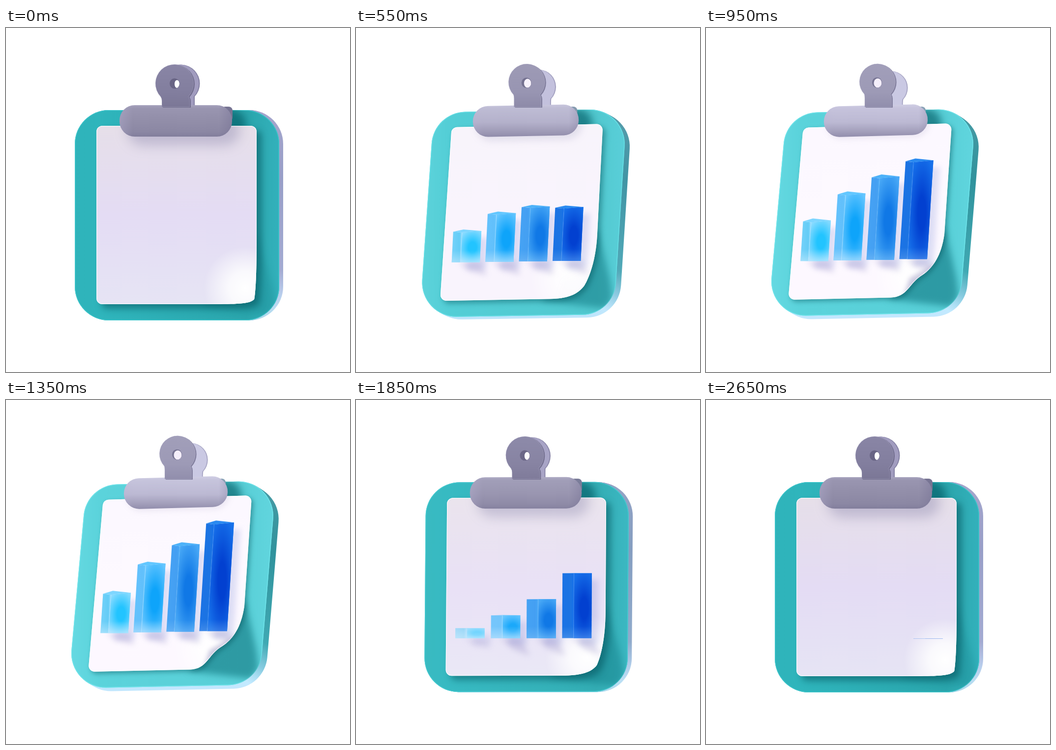
Animation, 700 px wide and 700 px high, one loop 2700 ms. Source, as an HTML page with a canvas:

```html
<!DOCTYPE html>
<html lang="en">
<head>
<meta charset="utf-8">
<title>Clipboard chart</title>
<style>
  html, body { margin: 0; width: 100%; height: 100%; overflow: hidden; background: #fff; }
  canvas { display: block; }
</style>
</head>
<body>
<canvas id="stage" width="700" height="700"></canvas>
<script>
const ctx = document.getElementById('stage').getContext('2d');
const LOOP = 2700, STEP = 50;

const clamp = v => Math.max(0, Math.min(1, v));
const lerp = (a, b, k) => a + (b - a) * k;
const mix = (a, b, k) => {
  const part = (c, i) => parseInt(c.slice(1 + 2 * i, 3 + 2 * i), 16);
  return `rgb(${[0, 1, 2].map(i => Math.round(lerp(part(a, i), part(b, i), k)))})`;
};
const settle = (t, start) => 1 - (1 - clamp((t - start) / 1170) ** 1.2) ** 3;
const sway = (t, start, span) => (1 - Math.cos(Math.PI * clamp((t - start) / span))) / 2;

// Quads are TL, TR, BR, BL; first facing the viewer, then turned.
const BOARD = [[[140, 167], [556, 167], [556, 595], [140, 595]],
               [[164, 173], [550, 164], [515, 579], [126, 587]]];
const PAPER = [[[184, 199], [510, 199], [510, 562], [184, 562]],
               [[198, 203], [500, 194], [476, 546], [167, 553]]];
const ROLL = [[[231, 157], [460, 157], [460, 221], [231, 221]],
              [[240, 160], [452, 154.5], [450, 217], [240, 222.5]]];
const BARS = [
  { full: 87, rise: 29, fall: 1329, side: '#64ccf6', edge: '#8edcff', core: '#22c4ff' },
  { full: 143, rise: 76, fall: 1410, side: '#62c0fb', edge: '#66c6ff', core: '#0ea4fa' },
  { full: 181, rise: 142, fall: 1495, side: '#449ff2', edge: '#48a8f6', core: '#1078e6' },
  { full: 224, rise: 236, fall: 1595, side: '#1c74e2', edge: '#1670ea', core: '#0240d0' }
];

const pose = ([from, to], p) =>
  from.map((pt, i) => [lerp(pt[0], to[i][0], p), lerp(pt[1], to[i][1], p)]);

const within = quad => (u, v) => [0, 1].map(i =>
  lerp(lerp(quad[0][i], quad[1][i], u), lerp(quad[3][i], quad[2][i], u), v));

function poly(points) {
  const path = new Path2D();
  points.forEach(pt => path.lineTo(...pt));
  path.closePath();
  return path;
}

function rounded(quad, r) {
  const path = new Path2D();
  path.moveTo((quad[0][0] + quad[1][0]) / 2, (quad[0][1] + quad[1][1]) / 2);
  [1, 2, 3, 0].forEach(i => path.arcTo(...quad[i], ...quad[(i + 1) % 4], r));
  path.closePath();
  return path;
}

function gradient(shape, stops) {
  const g = shape.length === 4 ? ctx.createLinearGradient(...shape) : ctx.createRadialGradient(...shape);
  stops.forEach(([at, color]) => g.addColorStop(at, color));
  return g;
}

function fill(path, style, { dx = 0, dy = 0, blur = 0, clip } = {}) {
  ctx.save();
  if (clip) ctx.clip(clip);
  ctx.translate(dx, dy);
  if (blur) ctx.filter = `blur(${blur}px)`;
  ctx.fillStyle = style;
  ctx.fill(path);
  ctx.restore();
}

function outline(path, style, width, clip) {
  ctx.save();
  if (clip) ctx.clip(clip);
  ctx.strokeStyle = style;
  ctx.lineWidth = width;
  ctx.stroke(path);
  ctx.restore();
}

// The corner first lifts into a round curve, then folds back on itself.
const lifting = q => clamp(q / .6);
const folding = q => clamp((q - .77) / .23);

function paperPath(at, quad, q) {
  const path = new Path2D();
  const bend = (flat, lifted, folded) => lerp(lerp(flat, lifted, lifting(q)), folded, folding(q));
  const mu = bend(.985, .935, .87), mv = bend(.972, .93, .87);
  const curve = (a, b, c) => path.bezierCurveTo(...at(...a), ...at(...b), ...at(...c));
  path.moveTo(...at(.5, 0));
  path.arcTo(...quad[1], ...quad[2], 12);
  path.lineTo(...at(1, .64));
  curve([bend(1, 1, .99), bend(.83, .78, .76)], [mu + bend(.008, .03, .07), mv - bend(.04, .05, .04)], [mu, mv]);
  curve([mu - bend(.02, .035, .09), mv + bend(.025, .045, .045)], [bend(.88, .84, .785), 1], [bend(.75, .72, .67), 1]);
  path.arcTo(...quad[3], ...quad[0], 12);
  path.arcTo(...quad[0], ...quad[1], 12);
  path.closePath();
  return path;
}

function tabPath(cx, cy, r, right) {
  const path = new Path2D(), a = Math.PI * .24, neckY = cy + r * .9;
  path.moveTo(cx - 26, 161);
  path.lineTo(cx - 26, neckY);
  path.quadraticCurveTo(cx - 26, neckY - 5, cx - r * Math.cos(a), cy + r * Math.sin(a));
  path.arc(cx, cy, r, Math.PI - a, a);
  path.quadraticCurveTo(cx + right, neckY - 5, cx + right, neckY);
  path.lineTo(cx + right, 161);
  path.closePath();
  return path;
}

function drawBoard(p, tone, q, at, paper, roll) {
  const front = rounded(pose(BOARD, p), lerp(69, 70, p));
  const side = gradient([0, 180, 0, 595], [
    [0, mix('#a4a5cc', '#459aa4', tone)], [.3, mix('#989fc8', '#2f929c', tone)],
    [.75, mix('#a3abd2', '#3fa9b3', tone)], [.87, mix('#b9cdec', '#86cbe0', tone)],
    [.94, mix('#b9dcf2', '#c3eaff', tone)], [1, mix('#a9d8ea', '#c0e4fc', tone)]]);
  for (let k = 8; k > 0; k--) fill(front, side, { dx: k / 8 * lerp(8, 11, p), dy: k / 8 * 7 * p });
  fill(front, gradient([140, 0, 550, 0], [
    [0, mix('#2fb3ba', '#65d8e1', tone)], [.12, mix('#2fb5bc', '#5bd3db', tone)],
    [.85, mix('#2aa5ac', '#59cfd7', tone)], [1, mix('#32b0ba', '#62d6df', tone)]]));
  outline(front, mix('#3cc6cb', '#6fe4ea', tone), 3, front);
  fill(roll, 'rgba(0,88,98,.62)', { dx: 28, dy: 8, blur: 8, clip: front });
  fill(poly([at(1, .6), at(1.1, .9), at(1.12, 1), at(1.08, 1.06), at(.66, 1.01)]),
    `rgba(8,108,118,${.2 + .33 * q})`, { blur: 7, clip: front });
  fill(paper, `rgba(0,75,85,${lerp(.5, .42, p)})`,
    { dx: lerp(10, 4, p), dy: lerp(9, 4, p), blur: lerp(7, 5, p), clip: front });
}

function drawPaper(p, tone, q, at, paper, roll) {
  fill(paper, gradient([0, 200, 0, 560], [
    [0, mix('#e6dfe9', '#fcf8ff', tone)], [.5, mix('#e4dcf4', '#fdf9ff', tone)], [1, mix('#e6e4f4', '#fdf8ff', tone)]]));
  fill(roll, `rgba(105,100,150,${lerp(.3, .1, p)})`,
    { dx: lerp(16, 4, p), dy: lerp(18, 5, p), blur: lerp(12, 6, p), clip: paper });

  const [gx, gy] = at(lerp(.93, .83, q), lerp(.91, .88, q));
  fill(paper, gradient([gx, gy, 0, gx, gy, 85], [[0, '#fff'], [.4, 'rgba(255,255,255,.8)'], [1, 'rgba(255,255,255,0)']]));
  fill(poly([at(.97, .8), at(.79, .89), at(.76, .99), at(.85, 1), at(1, .9)]),
    `rgba(125,120,175,${.4 * folding(q)})`, { blur: 5, clip: paper });
  outline(paper, 'rgba(255,255,255,.8)', 2.5, paper);
}

function drawBars(t, p, paper) {
  BARS.forEach((bar, i) => {
    const part = settle(t, bar.rise) - settle(t, bar.fall), h = bar.full * part;
    if (h < .15) return;
    const x = lerp(203 + 73 * i, 192 + 67 * i, p), y = lerp(486, 474 - 1.3 * i, p);
    const w = lerp(60, 56.5, p), s = lerp(24, 16, p);
    const tilt = p * clamp(h / 40), lean = .063 * p * h, top = y - h;
    const left = [x + lean, top + 5 * tilt], back = [x + s + lean + 4 * tilt, top - tilt];
    const near = [x + s + lean, top + 7 * tilt], right = [x + w + lean, top + 3 * tilt];
    const foot = [x + s, y], strength = clamp(.4 + .14 * i + part);

    ctx.globalAlpha = clamp(h / 35);
    fill(poly([near, right, [x + w, y], foot]), 'rgba(100,115,205,.2)',
      { dx: 13, dy: 13, blur: 6, clip: paper });
    const reach = Math.min(lerp(40, 26, p), h * .8 + 6);
    fill(poly([[x + s - 4, y], [x + w, y], [x + w + reach * .5, y + reach * .9], [x + s + reach * .6, y + reach * .6]]),
      'rgba(125,118,185,.24)', { blur: 6, clip: paper });

    ctx.globalAlpha = strength;
    fill(poly([left, near, foot, [x, y]]),
      gradient([x, 0, x + s + lean, 0], [[0, mix(bar.edge, bar.side, .6)], [.75, bar.side], [1, bar.edge]]));
    const face = poly([near, right, [x + w, y], foot]);
    fill(face, bar.edge);
    // A stretched glow gives the glassy core.
    ctx.save();
    ctx.clip(face);
    ctx.translate(x + (s + w) / 2 + lean / 2 + 3, y - h * .46);
    ctx.transform(1, 0, -.063 * p, Math.max(.2, h / 50), 0, 0);
    ctx.fillStyle = gradient([0, 0, 1, 0, 0, 30], [[0, bar.core], [.25, bar.core], [1, bar.edge]]);
    ctx.fillRect(-60, -60, 120, 120);
    ctx.restore();
    fill(poly([left, back, right, near]), mix(bar.edge, '#58c8ff', .3));

    ctx.globalAlpha = (i < 2 ? .45 : .18) * clamp(h / 20);
    fill(poly([left, near, right, [x + w, y], [x, y]]),
      gradient([0, y - 24, 0, y], [[0, 'rgba(225,242,255,0)'], [1, '#e1f2ff']]));
    outline(poly([near, foot]), '#bfe6ff', 1.5);
    ctx.globalAlpha = 1;
  });
}

function drawClipBack(p, tone) {
  fill(rounded([[438, 160], [461, 160], [461, 190], [438, 190]], 8), mix('#777493', '#87a2b5', tone), { dx: -14 * p });
  const rear = tabPath(lerp(355, 376, p), lerp(113, 122, p), lerp(38.5, 34, p), lerp(28, 24, p));
  fill(rear, mix('#8480a3', '#aaa8c6', tone), { dx: 1 });
  fill(rear, mix('#a19cbf', '#cac9e3', tone), { dx: -1 });
}

function drawClipFront(p, tone, roll) {
  fill(roll, gradient([0, 155, 0, 222], [
    [0, mix('#aaa6c1', '#d0cee4', tone)], [.12, mix('#9995b0', '#c6c4dc', tone)],
    [.55, mix('#918da8', '#bcb9d3', tone)], [.85, mix('#8b87a3', '#a19db9', tone)], [1, mix('#817d9b', '#918dac', tone)]]));
  fill(roll, gradient([231, 0, 460, 0], [
    [0, 'rgba(185,180,215,.35)'], [.12, 'rgba(185,180,215,0)'],
    [.88, 'rgba(100,95,135,0)'], [1, 'rgba(100,95,135,.28)']]));

  const cx = lerp(343, 349, p), cy = lerp(113, 109.5, p), r = lerp(39, 36.7, p);
  const tab = tabPath(cx, cy, r, lerp(31, 29, p));
  fill(tab, mix('#6f6b8b', '#807d9c', tone), { dx: 2, dy: 1 });
  fill(tab, gradient([0, 75, 0, 161], [
    [0, mix('#8985a5', '#a19eb9', tone)], [.65, mix('#827e9e', '#9d9ab6', tone)], [1, mix('#7b7796', '#918eac', tone)]]));
  outline(tab, 'rgba(185,182,210,.4)', 1.5, tab);

  const hole = new Path2D(), light = new Path2D(), hx = cx - p, hy = cy + 1.5 * p;
  hole.ellipse(hx, hy, 10, 10.5, 0, 0, 7);
  light.ellipse(hx + lerp(5, 1.5, p), hy + 1, lerp(5, 8, p), lerp(8, 9.5, p), 0, 0, 7);
  fill(hole, mix('#686484', '#777493', tone));
  fill(light, mix('#ffffff', '#f4eefa', tone), { clip: hole });
}

function draw(t) {
  const p = settle(t, 30) - sway(t, 1300, 680), tone = clamp(p) ** .7;
  const q = clamp(settle(t, 10) - settle(t, 1500));
  const sheet = pose(PAPER, p), at = within(sheet);
  const paper = paperPath(at, sheet, q), roll = rounded(pose(ROLL, p), 31);
  ctx.clearRect(0, 0, 700, 700);
  drawBoard(p, tone, q, at, paper, roll);
  drawPaper(p, tone, q, at, paper, roll);
  drawBars(t, p, paper);
  drawClipBack(p, tone);
  drawClipFront(p, tone, roll);
}

const begin = performance.now();
function tick() {
  const t = (performance.now() - begin) % LOOP;
  draw(Math.floor(t / STEP) * STEP);
  requestAnimationFrame(tick);
}
tick();
</script>
</body>
</html>
```
